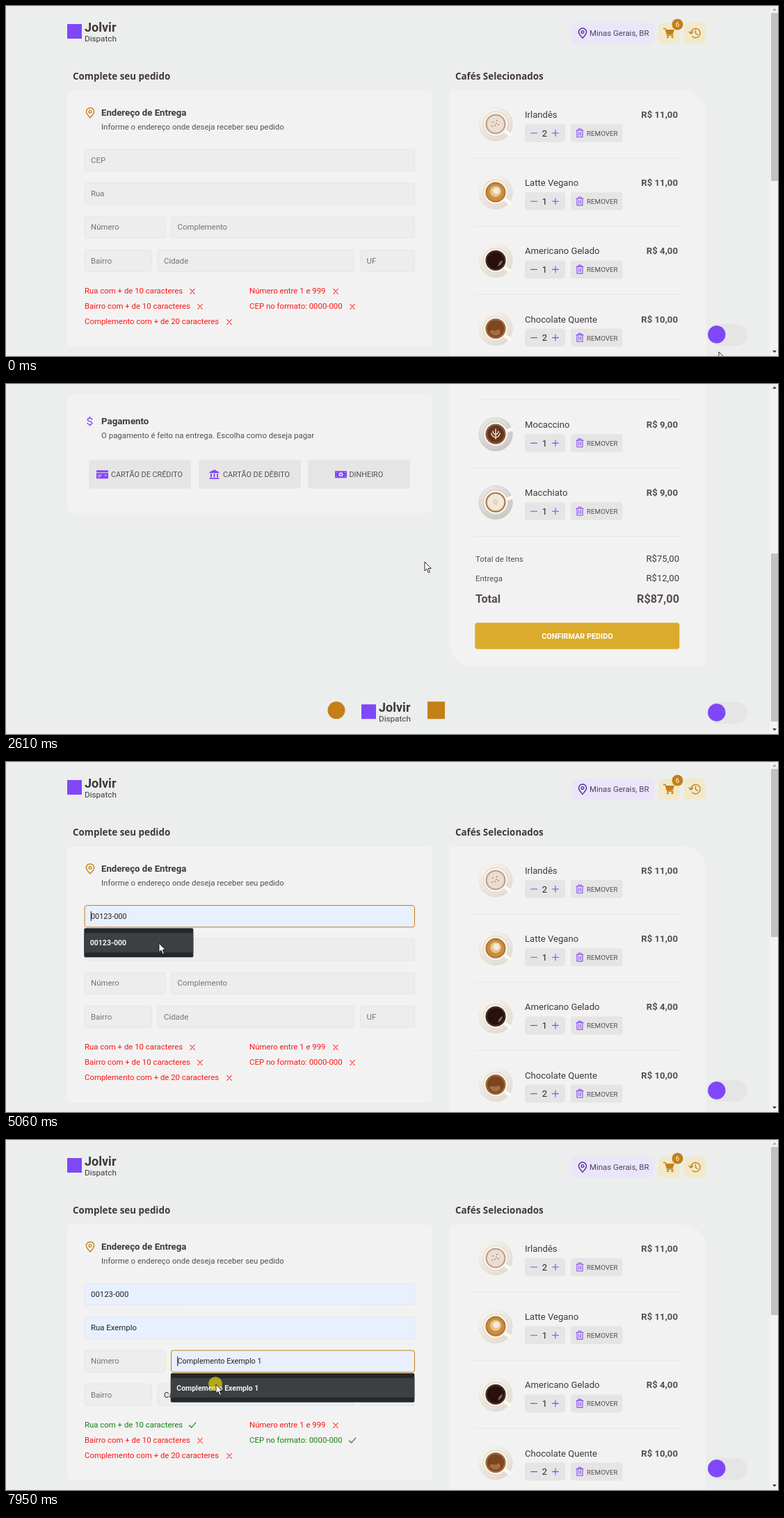
An HTML page for the animation above (8 s loop, 1110 by 504 pixels).

```html
<!DOCTYPE html>
<html lang="pt-BR">
<head>
<meta charset="utf-8">
<title>Checkout</title>
<style>
html, body { margin: 0; width: 100%; height: 100%; overflow: hidden; background: #ebeeed; }
svg { display: block; width: 1110px; height: 504px; font-family: Roboto, sans-serif; font-size: 11.4px; fill: #574f4d; }
text { white-space: pre; }
.line { fill: none; stroke-linecap: round; stroke-linejoin: round; }
.head { font: 700 13.4px "Noto Sans", sans-serif; fill: #403937; }
</style>
</head>
<body>
<svg id="stage" viewBox="0 0 1110 504"></svg>
<script>
const PURPLE = '#8047f8', ORANGE = '#c47f17', CARD = '#f3f2f2', BTN = '#e6e5e5';
const LOOP = 8000, STEP = LOOP / 117;

// Markup helpers
const rect = (x, y, w, h, r, fill, more = '') =>
  `<rect x="${x}" y="${y}" width="${w}" height="${h}" rx="${r}" fill="${fill}" ${more}/>`;
const circle = (x, y, r, fill, more = '') => `<circle cx="${x}" cy="${y}" r="${r}" fill="${fill}" ${more}/>`;
const text = (x, y, s, size = 11.42, fill = '#574f4d', more = '') =>
  `<text x="${x}" y="${y}" font-size="${size}" fill="${fill}" ${more}>${s}</text>`;
const line = (d, color, w = 1.2) => `<path class="line" d="${d}" stroke="${color}" stroke-width="${w}"/>`;
const shape = (d, fill) => `<path d="${d}" fill="${fill}"/>`;
const at = (x, y, s) => `<g transform="translate(${x} ${y})">${s}</g>`;
const BOLD = 'font-weight="700"', END = 'text-anchor="end"', MID = 'text-anchor="middle"';

const pin = (x, y, color) => at(x, y,
  line('M0 7.3C-3 4-5.6 1.6-5.6-1.4a5.6 5.6 0 0 1 11.2 0C5.6 1.6 3 4 0 7.3Z', color, 1.4) +
  circle(0, -1.5, 1.9, 'none', `stroke="${color}" stroke-width="1.3"`));

const brand = (x, y) => at(x, y,
  rect(0, 5, 21, 21, 0, PURPLE) +
  text(25, 16, 'Jolvir', 18, '#403937', BOLD) +
  text(25, 30, 'Dispatch', 11.7, '#403937'));

function header() {
  return brand(88, 21) +
    rect(814, 24, 118, 30, 5, '#ebe5f9') + pin(829, 39, '#4b2995') +
    text(839, 43.3, 'Minas Gerais, BR', 11.42, '#4a4160') +
    rect(938, 24, 30.5, 30, 5, '#f1e9c9') +
    at(953, 39, line('M-7.5-6.5H-5L-2 3.2H6', ORANGE, 1.4) + shape('M-5-5H8L5.5 2H-2.6Z', ORANGE) +
      circle(-1.5, 5.8, 1.5, ORANGE) + circle(5, 5.8, 1.5, ORANGE)) +
    circle(965.5, 26.5, 8, ORANGE) + text(965.5, 30, '6', 9.75, '#fff', MID) +
    rect(975, 24, 30.5, 30, 5, '#f1e9c9') +
    at(991.5, 39, line('M-4.5 4.9A6.6 6.6 0 1 0-6.6 0M-9.3-1.8L-6.6 1L-3.9-1.8M0-3.8V.5L3 2.3', ORANGE, 1.4)) +
    `<text class="head" x="96" y="105.5">Complete seu pedido</text>` +
    `<text class="head" x="646" y="105.5">Cafés Selecionados</text>`;
}

// Address form
const FIELDS = {
  cep: [113, 206.5, 474.5, 'CEP'], rua: [113, 254.7, 474.5, 'Rua'],
  num: [113, 303, 116, 'Número'], comp: [237.5, 303, 350, 'Complemento'],
  bairro: [113, 351.2, 96.5, 'Bairro'], city: [218, 351.2, 282.5, 'Cidade'], uf: [509.5, 351.2, 78, 'UF']
};
const FIELD_H = 31.3;
const RULES = [
  ['rua', 113, 414, 268, 'Rua com + de 10 caracteres'],
  ['bairro', 113, 436, 279, 'Bairro com + de 10 caracteres'],
  ['comp', 113, 458, 321, 'Complemento com + de 20 caracteres'],
  ['num', 350, 414, 474, 'Número entre 1 e 999'],
  ['cep', 350, 436, 498, 'CEP no formato: 0000-000']
];

function addressCard() {
  let s = rect(88, 122, 524, 368, 5, CARD) + pin(121, 153.7, ORANGE) +
    text(137, 158, 'Endereço de Entrega', 13.2, '#403937', BOLD) +
    text(137, 177.5, 'Informe o endereço onde deseja receber seu pedido');
  for (const id in FIELDS) {
    const [x, y, w] = FIELDS[id];
    s += `<g id="${id}">${rect(x, y, w, FIELD_H, 3.3, '')}${text(x + 9, y + 19.4, '')}` +
      `<path stroke="#111"/></g>`;
  }
  for (const [id, x, y, mx, label] of RULES)
    s += `<g id="rule-${id}">${text(x, y, label, 11.4, '')}${at(mx, y - 3.5, line('', '', 1.1))}</g>`;
  return s;
}

function paymentCard() {
  const y = 600, mid = 621;
  const button = (x, tx, label, ix, icon) => rect(x, y, 147, 41.5, 4, BTN) +
    at(ix, mid, icon) + text(tx, mid + 3.8, label, 10.83);
  const card = rect(-8.5, -6, 17, 12, .5, PURPLE) + line('M-8.5-2.6H8.5M-6 1H-1M-6 3.4H-3M3.5 1.5H6', BTN, 1.1);
  const bank = shape('M0-7L7-3.2V-2H-7V-3.2ZM-5.5-1h2v5h-2ZM-1-1h2v5h-2ZM3.5-1h2v5h-2ZM-7 4.8H7V6.5H-7Z', PURPLE);
  const cash = rect(-8.5, -5, 17, 10, .5, PURPLE) + circle(0, 0, 3, BTN) + circle(0, 0, 1.2, PURPLE) +
    [[-6.5, -3], [6.5, -3], [-6.5, 3], [6.5, 3]].map(p => circle(...p, .6, BTN)).join('');
  return rect(88, 506.5, 524, 169.5, 5, CARD) +
    at(120.5, 544.5, line('M3.2-2.6C2.8-5.3-3.2-5.3-3.2-2.4C-3.2.6 3.3-.6 3.3 2.5C3.3 5.4-3 5.2-3.3 2.4M0-6.5V-4.6M0 4.6V6.5', PURPLE, 1.4)) +
    text(137, 549, 'Pagamento', 13.3, '#403937', BOLD) +
    text(137, 568.8, 'O pagamento é feito na entrega. Escolha como deseja pagar', 11.45) +
    button(119, 151, 'CARTÃO DE CRÉDITO', 138.5, card) +
    button(277, 312, 'CARTÃO DE DÉBITO', 299.5, bank) +
    button(434, 493.5, 'DINHEIRO', 481.5, cash);
}

// Order list: name, quantity, price, brew colour, rim colour, surface detail
const leaf = color => line('M0-7V7M0 5C-4 4-6 1-6-1M0 5C4 4 6 1 6-1M0 1C-3 0-4-3-4-4M0 1C3 0 4-3 4-4', color, 1.5);
const ITEMS = [
  ['Irlandês', 2, '11,00', '#eaded4', '#c7a184',
    [[-4, -3], [2, -5], [4, 1], [-1, 2], [-5, 3], [1, -1]].map(p => circle(...p, .8, '#8a5340')).join('')],
  ['Latte Vegano', 1, '11,00', '#c98d42', '#b87831', circle(0, -1, 8, '#e6c48f') + circle(1, -2, 4.8, '#f6ead6')],
  ['Americano Gelado', 1, '4,00', '#26110f', '#4a2a20', shape('M3 9C7 7 10 4 10-1L5 3Z', '#7d6560')],
  ['Chocolate Quente', 2, '10,00', '#7c4620', '#9c6a3e', shape('M-9 4C-5-1 0 6 3 1C6 1 8 4 6 8C0 12-6 10-9 4Z', '#a56e42')],
  ['Mocaccino', 1, '9,00', '#63351f', '#8a5a3c', leaf('#f0dcc0')],
  ['Macchiato', 1, '9,00', '#f0e8dc', '#b07f4a', line('M-3-2L0-4L3-1L1 3L-2 2ZM0-1V2', '#dcc8a6', 1.2)]
];

function cup(i, brew, rim, detail) {
  const late = i > 3;
  return circle(0, 0, 24.7, late ? 'url(#saucerB)' : 'url(#saucerA)') +
    circle(0, 0, 18.5, late ? '#d0cdc9' : '#e0d9cf') +
    line(late ? 'M14-4L23-7' : 'M12 9L20 15', '#fbf9f6', 5) +
    circle(0, 0, 17, '#faf8f5') + circle(0, 0, 14.6, rim) + circle(0, 0, 12.2, brew) + detail;
}

function orderCard() {
  let s = shape('M643 122H974A32 32 0 0 1 1006 154V892A5 5 0 0 1 1001 897H670A32 32 0 0 1 638 865V127A5 5 0 0 1 643 122Z', CARD);
  ITEMS.forEach(([name, qty, price, brew, rim, detail], i) => {
    s += at(0, i * 98.2,
      at(704, 170, cup(i, brew, rim, detail)) +
      text(746, 161, name, 13.1, '#403937') +
      text(966, 161, 'R$ ' + price, 13.2, '#574f4d', `${BOLD} ${END}`) +
      rect(746, 170, 58, 26, 4, BTN) + rect(812, 170, 74.5, 26, 4, BTN) +
      line('M754.5 183H763.5M785.5 183H794.5M790 178.5V187.5', PURPLE, 1.1) +
      text(774.5, 187.5, qty, 13, '#272221', MID) +
      at(825, 183, line('M-5-4H5M-2-4V-6H2V-4M-4-4V5.7H4V-4M-1.3-1.5V3.2M1.3-1.5V3.2', PURPLE, 1.1)) +
      text(835, 187, 'REMOVER', 9.8) + rect(672, 218.6, 300, .9, 0, BTN));
  });
  const total = (y, label, sum, a, b, more = '') =>
    text(675, y, label, a, '#574f4d', more) + text(968, y, sum, b, more ? '#574f4d' : '#403937', `${END} ${more}`);
  return s + total(746.3, 'Total de Itens', 'R$75,00', 11.42, 13.1) + total(774.5, 'Entrega', 'R$12,00', 11.42, 13.1) +
    total(806, 'Total', 'R$87,00', 16.25, 16.25, BOLD) +
    rect(674.3, 834.5, 294, 38, 4, '#dbac2c') +
    text(821.5, 857.8, 'CONFIRMAR PEDIDO', 10.83, '#fff', `${MID} ${BOLD}`);
}

const footer = () => circle(475, 960.5, 12.5, ORANGE) + brand(511, 947) + rect(606, 948, 25, 25, 0, ORANGE);

const fixed = () =>
  rect(1009, 458, 57, 31, 15.5, '#e5e5e5') + circle(1021.8, 473, 12.7, PURPLE) +
  rect(1098.5, 0, 11.5, 504, 0, '#f3f3f3') + rect(1100, 10, 10, 242, 0, '#c1c1c1', 'id="thumb"') +
  `<path id="up" d="M1102 6.8L1105 3.2L1108 6.8Z"/>` + shape('M1102 496L1105 499.6L1108 496Z', '#404040');

const saucer = (id, a, b) => `<radialGradient id="${id}" cx=".4" cy=".35" r=".7">` +
  `<stop offset=".4" stop-color="${a}"/><stop offset="1" stop-color="${b}"/></radialGradient>`;

const $ = id => document.getElementById(id);
$('stage').innerHTML =
  `<defs>${saucer('saucerA', '#f5f1ea', '#dfd9d0')}${saucer('saucerB', '#e6e4e1', '#c6c3bf')}</defs>` +
  `<g id="page">${header()}${addressCard()}${paymentCard()}${orderCard()}${footer()}` +
  `<g id="menu">${rect(0, 0, 0, 42, 2, '#26272a')}${rect(0, 7, 0, 28, 0, '#3c4043')}` +
  `${text(8.5, 25, '', 10.5, '#f1f1f1', BOLD)}</g></g>${fixed()}` +
  circle(-1, -1, 10, '#ffe600', 'id="press" fill-opacity=".62"') +
  `<g id="arrow"><path d="M0 0V13L3 10.2L5.2 15.6L7.4 14.7L5.2 9.5H9.2Z" fill="#fff" stroke="#111" stroke-width=".9"/></g>` +
  `<g id="beam">${line('M-2.5-7H-1L0-6L1-7H2.5M0-6V6M-2.5 7H-1L0 6L1 7H2.5', '#222', 1)}</g>`;

// Timeline
const SCROLL = [[0, 0], [420, 0], [500, 25], [830, 215], [1180, 470], [1270, 499], [2560, 499], [2608, 491],
  [2680, 450], [2960, 230], [3030, 185], [3087, 148], [3160, 116], [3235, 99], [3400, 99], [3440, 88],
  [3580, 30], [3650, 8], [3710, 0], [LOOP, 0]];
const MOVES = [[0, 1025, 498], [30, 1025, 498], [480, 640, 170], [700, 592, 135], [1310, 589, 127], [1650, 602, 244],
  [1800, 602, 256], [4290, 602, 256], [4640, 250, 225], [4760, 222, 214], [4850, 222, 214], [5050, 220, 261],
  [5250, 220, 261], [5480, 230, 285], [5690, 240, 270], [5760, 240, 270], [5930, 237, 309], [6130, 237, 309],
  [6450, 262, 330], [6560, 267, 334], [6800, 267, 334], [6990, 273, 341], [7340, 154, 322], [7600, 176, 316],
  [7710, 296, 319], [7770, 296, 319], [7890, 302, 352], [LOOP, 302, 352]];
const PRESSES = [[4770, 4870], [5190, 5260], [5700, 5770], [6090, 6160], [6640, 6700], [7720, 7780], [7930, LOOP]];
// Each fill: value, focus on, focus off, menu opens, value chosen, menu width
const FILLS = {
  cep: ['00123-000', 4780, 5730, 4850, 5220, 157],
  rua: ['Rua Exemplo', 5730, 6680, 5790, 6150, 157],
  comp: ['Complemento Exemplo 1', 7730, LOOP, 7790, LOOP, 350.5]
};
const LOOKUP = { city: 'Cachoeira de Minas', uf: 'MG' }, LOOKUP_AT = 5480;

const smooth = u => u * u * (3 - 2 * u);
function sample(keys, t, ease = u => u) {
  const i = Math.max(1, keys.findIndex(k => k[0] >= t));
  const a = keys[i - 1], b = keys[i], u = ease((t - a[0]) / (b[0] - a[0]));
  return a.slice(1).map((v, j) => v + (b[j + 1] - v) * u);
}
const within = (t, from, to) => t >= from && t < to;
const inside = (px, py, x, y, w, h) => px >= x && px <= x + w && py >= y && py <= y + h;
const set = (el, attrs) => { for (const k in attrs) el.setAttribute(k, attrs[k]); };
const show = (el, on) => set(el, { visibility: on ? 'visible' : 'hidden' });

function drawField(id, t, hover) {
  const [x, y, , hint] = FIELDS[id], [box, label, caret] = $(id).children;
  const [value, on, off, , chosen] = FILLS[id] || [];
  const done = value && t >= chosen, preview = hover === id, focus = value && within(t, on, off);
  const filled = done || preview, looked = LOOKUP[id] && t >= LOOKUP_AT;
  label.textContent = filled ? value : looked ? LOOKUP[id] : hint;
  set(label, { fill: filled || looked ? '#222' : '#777372', 'font-size': preview ? 10.83 : 11.4 });
  set(box, { fill: filled ? '#e8f0fe' : '#ecedec', stroke: focus ? ORANGE : BTN });
  show(caret, focus);
  if (focus) {
    const cx = x + 9.3 + (done ? label.getComputedTextLength() : 0);
    set(caret, { d: `M${cx} ${y + 8.5}V${y + 22.5}` });
  }
}

function drawMenu(t, mx, my) {
  const id = Object.keys(FILLS).find(k => within(t, FILLS[k][3], FILLS[k][4]));
  show($('menu'), id);
  if (!id) return {};
  const [x, y] = FIELDS[id], [value, , , , , w] = FILLS[id], top = y + 32.8;
  const [back, row, label] = $('menu').children;
  const over = inside(mx, my, x, top, w, 42);
  set($('menu'), { transform: `translate(${x - .7} ${top})` });
  set(back, { width: w });
  set(row, { width: w, fill: over ? '#3c4043' : '#26272a' });
  label.textContent = value;
  return { over, hover: over && id };
}

function draw(t) {
  const [scroll] = sample(SCROLL, t), [mx, my] = sample(MOVES, t, smooth);
  set($('page'), { transform: `translate(0 ${-scroll})` });
  set($('thumb'), { y: 10 + scroll * .477 });
  set($('up'), { fill: scroll > 0 ? '#404040' : '#a8a8a8' });

  const { over, hover } = drawMenu(t, mx, my + scroll);
  for (const id in FIELDS) drawField(id, t, hover);
  for (const [id] of RULES) {
    const ok = FILLS[id] && t >= FILLS[id][4], [label, mark] = $('rule-' + id).children;
    const color = ok ? '#138013' : '#fb1616';
    set(label, { fill: color });
    set(mark.firstChild, { d: ok ? 'M-4.5 .5L-1.3 3.6L4.8-3.6' : 'M-3.2-3L3.2 4M3.2-3L-3.2 4', stroke: color });
  }

  const typing = !over && Object.values(FIELDS).some(([x, y, w]) => inside(mx, my + scroll, x, y, w, FIELD_H));
  for (const id of ['press', 'arrow', 'beam']) set($(id), { transform: `translate(${mx} ${my})` });
  show($('press'), PRESSES.some(p => within(t, ...p)));
  show($('arrow'), !typing);
  show($('beam'), typing);
}

const start = performance.now();
function tick() {
  const t = (performance.now() - start) % LOOP;
  draw((Math.floor(t / STEP) + .15) * STEP);
  requestAnimationFrame(tick);
}
tick();
</script>
</body>
</html>
```
